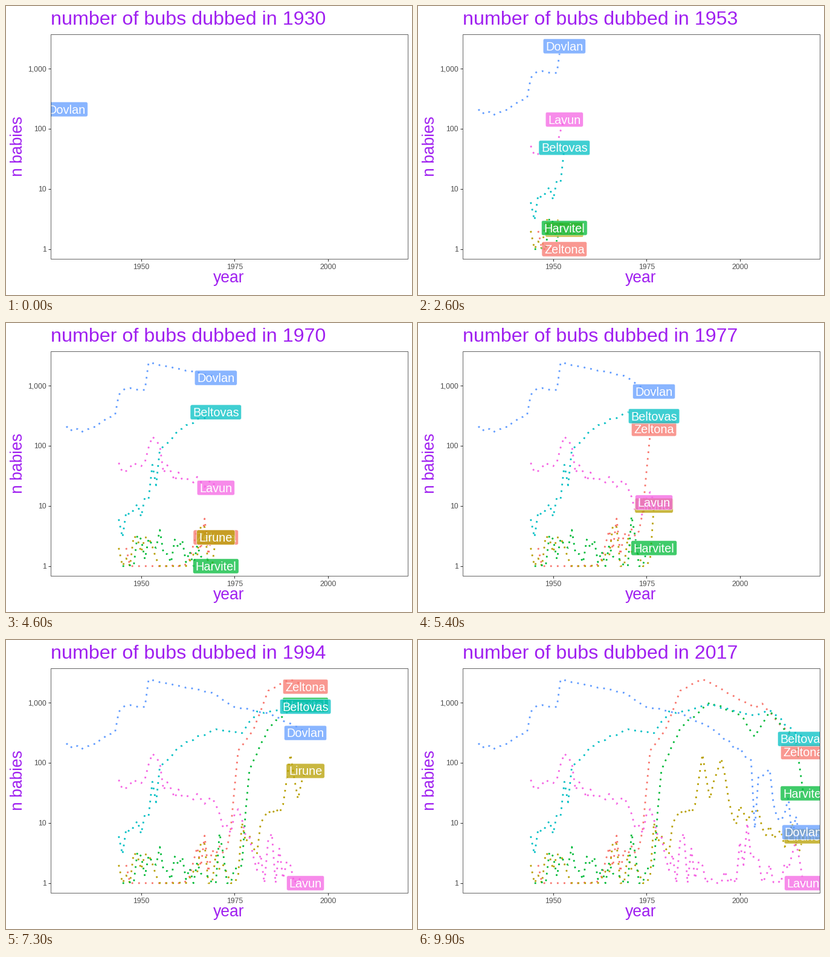
A matplotlib script that plays this animation: 672x480 px, repeating every 10 s.

```python
import numpy as np
import matplotlib.pyplot as plt
from matplotlib.animation import FuncAnimation
from matplotlib.patches import FancyBboxPatch, Rectangle

W, H, DPI = 672, 480, 96
PT = 72 / DPI                      # points per pixel
FRAMES, INTERVAL = 100, 100
FIRST, LAST = 1930, 2017
LEFT, RIGHT, TOP, BOTTOM = 73.5, 664.5, 47, 420.4
PURPLE, INK, GREY = "#A020F0", "#333333", "#4D4D4D"

plt.rcParams.update({"font.family": "Liberation Sans", "path.simplify": False})

# name: (colour, turning points as {year: count})
SERIES = {
    "Zeltona": ("#F8766D", {
        1946: 2, 1947: 1, 1958: 1, 1970: 3, 1974: 8, 1976: 160, 1980: 340,
        1984: 1560, 1990: 2450, 2004: 820, 2006: 960, 2017: 150}),
    "Lirune": ("#B79F00", {
        1944: 2, 1945: 1, 1951: 3, 1955: 1, 1960: 1, 1970: 3, 1974: 1,
        1984: 16, 1988: 20, 1990: 138, 1992: 25, 1995: 118, 1998: 13,
        2004: 17, 2012: 4, 2017: 6}),
    "Harvitel": ("#00BA38", {
        1945: 1, 1954: 2, 1960: 2, 1970: 1, 1972: 3, 1974: 1, 1977: 2,
        1979: 75, 1984: 370, 1992: 1010, 2000: 620, 2004: 269, 2008: 710,
        2015: 240, 2017: 31}),
    "Beltovas": ("#00BFC4", {
        1944: 6, 1945: 3, 1946: 8, 1954: 22, 1955: 86, 1960: 182, 1970: 360,
        1977: 310, 1981: 710, 1984: 690, 1992: 920, 2004: 600, 2008: 750,
        2017: 248}),
    "Dovlan": ("#619CFF", {
        1930: 210, 1931: 175, 1936: 190, 1943: 320, 1944: 695, 1946: 900,
        1951: 845, 1952: 2420, 1969: 1450, 1975: 840, 1984: 665, 1993: 350,
        2003: 111, 2004: 8, 2005: 60, 2008: 78, 2010: 12, 2017: 7}),
    "Lavun": ("#F564E3", {
        1944: 52, 1946: 38, 1951: 53, 1953: 142, 1955: 100, 1956: 35,
        1960: 36, 1970: 20, 1973: 9, 1976: 17, 1982: 3, 1983: 1, 1984: 5,
        1994: 1, 2001: 2, 2011: 1, 2015: 5, 2017: 1}),
}


def x_px(year):
    return 100.1 + 6.18 * (np.asarray(year) - FIRST)


def y_px(log_n):
    return 403.8 - 100 * np.asarray(log_n)


def history(points, seed):
    """Yearly log counts: straight between turning points, plus jitter
    that is largest for rare names and vanishes at a count of one."""
    knots = list(points)
    years = np.arange(knots[0], LAST + 1)
    logs = np.interp(years, knots, np.log10(list(points.values())))
    n = 10 ** logs
    noise = np.random.default_rng(seed).normal(0, (1 - 1 / n) / n ** 0.7)
    noise[np.isin(years, knots)] = 0
    return years, np.maximum(logs + noise, 0)


fig = plt.figure(figsize=(W / DPI, H / DPI), dpi=DPI, facecolor="white")
ax = fig.add_axes([0, 0, 1, 1])
ax.set(xlim=(0, W), ylim=(H, 0))
ax.axis("off")


def text(x, y, s, size, color, **kw):
    return ax.text(x, y, s, fontsize=size * PT, color=color, va="baseline",
                   **kw)


def tick(xs, ys):
    ax.plot(xs, ys, color=INK, lw=1.07 * PT, solid_capstyle="butt")


class Track:
    """A dotted line with a name tag riding on its newest point."""

    HEIGHT = 24.6

    def __init__(self, name, color, points, index):
        z = 10 + index
        self.years, logs = history(points, index)
        self.x, self.y = x_px(self.years), y_px(logs)
        self.line, = ax.plot([], [], color=color, lw=2.774 * PT,
                             ls=(0, (1, 3)), dash_capstyle="butt", zorder=3)
        self.label = text(0, 0, name, 19.92, "white", ha="center",
                          zorder=z + 0.5)
        self.width = self.label.get_window_extent().width + 8
        self.box = FancyBboxPatch(
            (0, 0), self.width, self.HEIGHT,
            boxstyle="round,pad=0,rounding_size=2.8",
            fc=color + "BF", ec="white", lw=0.6 * PT, zorder=z, snap=False)
        ax.add_patch(self.box)
        self.parts = self.line, self.label, self.box
        for part in self.parts:
            part.set_clip_path(panel)

    def show(self, year):
        n = year - self.years[0] + 1
        for part in self.parts:
            part.set_visible(n > 0)
        if n > 0:
            x, y = self.x[n - 1], self.y[n - 1]
            self.line.set_data(self.x[:n], self.y[:n])
            self.label.set_position((x, y + 7))
            self.box.set_x(x - self.width / 2)
            self.box.set_y(y - self.HEIGHT / 2)


panel = Rectangle((LEFT, TOP), RIGHT - LEFT, BOTTOM - TOP, fill=False,
                  ec=INK, lw=0.75 * PT, zorder=30)
ax.add_patch(panel)

for n in (1, 10, 100, 1000):
    y = float(y_px(np.log10(n)))
    tick([LEFT - 3.7, LEFT], [y, y])
    text(67, y + 4.3, f"{n:,}", 12.3, GREY, ha="right")
for year in (1950, 1975, 2000):
    x = float(x_px(year))
    tick([x, x], [BOTTOM, BOTTOM + 3.7])
    text(x, 436.7, str(year), 12.3, GREY, ha="center")

title = text(LEFT, 31, "", 32.3, PURPLE)
text(369, 458.6, "year", 26.5, PURPLE, ha="center")
text(27.2, 232.8, "n babies", 26.5, PURPLE, rotation=90,
     rotation_mode="anchor", ha="center")

tracks = [Track(name, color, points, i)
          for i, (name, (color, points)) in enumerate(SERIES.items())]


def draw(i):
    year = round(FIRST + (LAST - FIRST) * i / (FRAMES - 1))
    title.set_text(f"number of bubs dubbed in {year}")
    for track in tracks:
        track.show(year)
    return []


anim = FuncAnimation(fig, draw, frames=FRAMES, interval=INTERVAL,
                     init_func=lambda: draw(0), repeat=True, repeat_delay=0)
plt.show()
```
